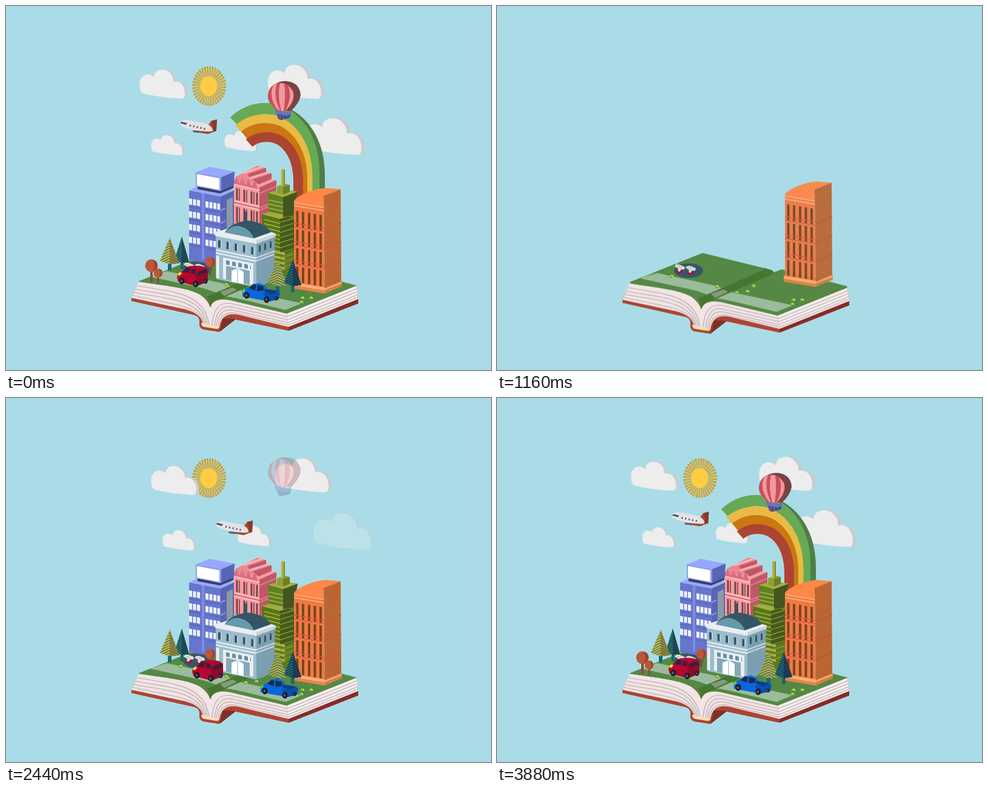
Animation, 800 px wide and 600 px high, one loop 3920 ms. Source, as an HTML page without scripts:

```html
<!DOCTYPE html>
<html lang="en">
<head>
<meta charset="utf-8">
<title>Pop-up city book</title>
<style>
html, body { margin: 0; height: 100%; overflow: hidden; background: #aadce7; }
svg { display: block; width: 800px; height: 600px; }

/* The page opens on the finished scene, 520 ms before the story starts over. */
.in, .drift, .book { animation: 3920ms linear -3400ms infinite; }
.in { --dy: 0px; animation-timing-function: cubic-bezier(.5, 1, .89, 1); }
.drop { --dy: -120px; }
.hop { --dy: -40px; }
.rise { --dy: 80px; }
.drift { --d: -7px -2px; animation-name: drift; }
.book { animation-name: book; transform-origin: 394px 470px; animation-delay: calc(-3400ms - var(--lag)); }

@keyframes drift {
  0%, 26.5% { translate: var(--a); }
  49% { translate: var(--b); }
  61.2% { translate: var(--c); }
  86.7% { translate: 0 0; }
  100% { translate: var(--d); }
}
@keyframes book {
  0% { opacity: 0; translate: 0 -365px; rotate: -37deg; }
  1% { opacity: .12; translate: 0 -347px; rotate: -36deg; }
  4.3% { opacity: .36; translate: 0 -148px; rotate: -27deg; }
  6.4% { opacity: 1; translate: 0 0; rotate: -6deg; }
  7.1% { translate: 0 31px; rotate: 0deg; }
  9.2% { translate: 0 -6px; }
  11.2% { translate: 0 2px; }
  13.8%, 15.8% { translate: 0 0; }
  16.3% { translate: 0 1px; }
  17.3% { translate: 0 5px; }
  20.7%, 100% { opacity: 1; translate: 0 0; rotate: 0deg; }
}
@keyframes office { 0%, 12.3% { opacity: 0; translate: 0 var(--dy); } 17.6% { opacity: 1; translate: 0 0; } }
@keyframes tower { 0%, 17.4% { opacity: 0; translate: 0 var(--dy); } 22% { opacity: 1; translate: 0 0; } }
@keyframes bank { 0%, 19.7% { opacity: 0; translate: 0 var(--dy); } 24.3% { opacity: 1; translate: 0 0; } }
@keyframes firs { 0%, 21.5% { opacity: 0; translate: 0 var(--dy); } 25.8% { opacity: 1; translate: 0 0; } }
@keyframes cloud1 { 0%, 20.5% { opacity: 0; } 23.5% { opacity: 1; } }
@keyframes cloud2 { 0%, 25.8% { opacity: 0; } 29.1% { opacity: 1; } }
@keyframes hotel { 0%, 27.6% { opacity: 0; translate: 0 var(--dy); } 32.2% { opacity: 1; translate: 0 0; } }
@keyframes flats { 0%, 30.1% { opacity: 0; translate: 0 var(--dy); } 34.7% { opacity: 1; translate: 0 0; } }
@keyframes firs2 { 0%, 33.2% { opacity: 0; translate: 0 var(--dy); } 37.3% { opacity: 1; translate: 0 0; } }
@keyframes late { 0%, 36.8% { opacity: 0; translate: 0 var(--dy); } 39.8% { opacity: 1; translate: 0 0; } }
@keyframes cars { 0%, 38.8% { opacity: 0; } 41.8% { opacity: 1; } }
@keyframes cloud3 { 0%, 48.4% { opacity: 0; } 52.2% { opacity: 1; } }
@keyframes grove { 0%, 52.1% { opacity: 0; translate: 0 var(--dy); } 56.2% { opacity: 1; translate: 0 0; } }
@keyframes bow { 0%, 56.2% { opacity: 0; translate: 0 var(--dy); } 63.3% { opacity: 1; translate: 0 0; } }
</style>
</head>
<body>
<svg viewBox="0 0 800 600" fill="none">
<defs>
  <path id="puff" d="M2,40C-2,24 2,10 16,9Q23,9 28,14C29,4 36,0 45,0C56,0 66,10 66,23C78,20 90,30 88,51Q87,56 80,56Q40,54 8,46Q3,45 2,40Z"/>
  <g id="cloud">
    <use href="#puff" x="5" y="-1" fill="#c9cbcd"/>
    <use href="#puff" fill="#ededee"/>
  </g>
  <clipPath id="cone"><path d="M0,0L-16,38L0,44L16,42Z"/></clipPath>
  <g id="fir">
    <path d="M-3,38h6v15q-3,2-6,0z" fill="#126a6c"/>
    <path d="M0,0L-16,38L0,44Z" fill="var(--l)"/>
    <path d="M0,0L16,42L0,44Z" fill="var(--r)"/>
    <g clip-path="url(#cone)" stroke="var(--s)" stroke-width="16" stroke-dasharray="1.4 2.8">
      <path d="M-8,0V60" transform="skewY(-25)"/>
      <path d="M8,0V60" transform="skewY(25)"/>
    </g>
  </g>
  <g id="ball">
    <path d="M-2,4h4v22q-2,2-4,0z" fill="#8a4a35"/>
    <circle r="10.5" fill="#bb5737"/>
    <path d="M2,-10A10.5,10.5 0 0 1 2,10Q8,0 2,-10Z" fill="#994433"/>
  </g>
  <g id="boat">
    <path d="M-6,5l3,4 7-2 2-4z" fill="#aa1133"/>
    <path d="M-9,-3Q-6,-8 1,-5L8,-2L7,2L2,2L-1,6L-4,4L-3,1Z" fill="#dfdcdc"/>
    <path d="M-5,-2Q0,-4 2,1" stroke="#aaa" />
  </g>
  <g id="bush">
    <path d="M-3,2Q-3,-2 1,-2Q4,-1 3,2Z" fill="#bbee55"/>
    <path d="M-4,1q3,3 7,1l-3,-2z" fill="#779933"/>
  </g>
  <g id="wheel">
    <ellipse rx="4.6" ry="5.4" fill="#1b1b2b"/>
    <ellipse cx="-.6" rx="2" ry="2.6" fill="#55586a"/>
  </g>

  <g id="volume">
    <path d="M207,481L219,456L463,507L578,461L581,484V490L466,535L376,516L352,537L326,533Q319,531 319,523V517Q318,511 310,509L207,486Z" fill="#ad4433"/>
    <path d="M466,528L581,483V490L466,535Z" fill="#882a26"/>
    <path d="M357,515L379,516L352,537Q356,528 357,515Z" fill="#7d3026"/>
    <path d="M322,522L352,527V529Q351,533 346,532L327,529Q322,528 322,522Z" fill="#ffddb0"/>
    <path d="M219,455C275,465 326,462 337,497C342,482 352,483 370,485L463,507L466,529L384,509Q356,503 352,529L325,524Q322,507 296,500L207,481Z" fill="#f1e5e5"/>
    <path d="M463,507L578,461L581,483L466,529Z" fill="#f4f0ef"/>
    <g stroke="#cbb9bd" stroke-width="1.7">
      <path d="M217,461C272,472 326,470 335,525M214,467C268,478 322,475 332,525M211,472C264,483 318,482 329,524M209,477L275,491Q322,500 326,523"/>
      <path d="M464,512L374,491Q343,484 340,526M465,517L376,497Q348,489 344,527M465,522L378,502Q351,495 347,528M466,526L382,507Q354,501 350,528"/>
      <path d="M464,512L579,466M465,517L579,471M465,522L580,476M466,526L580,480"/>
    </g>
    <path d="M219,454L339,406L449,433Q457,435 456,438L470,433L578,461L463,507L370,485C352,482 342,484 337,496C330,466 280,464 219,454Z" fill="#558844"/>
    <path d="M237,446L265,437L352,456Q370,460 380,467L488,490L461,501L395,485Q370,479 356,478Q345,470 320,464Z" fill="#9bbc9c"/>
    <path d="M442,431L452,434Q458,436 454,439L346,486Q339,489 337,496Q335,482 331,479Z" fill="#44772f"/>
    <path d="M353,471L374,464L381,468L360,478Z" fill="#88997a"/>
    <ellipse cx="316" cy="433" rx="24" ry="12" fill="#365568"/>
    <use href="#boat" x="302" y="429"/>
    <use href="#boat" x="320" y="431"/>
    <use href="#bush" x="288" y="442"/><use href="#bush" x="363" y="459"/>
    <use href="#bush" x="395" y="469"/><use href="#bush" x="413" y="467"/>
    <use href="#bush" x="423" y="458"/><use href="#bush" x="489" y="481"/>
    <use href="#bush" x="503" y="481"/><use href="#bush" x="487" y="488"/>
  </g>
</defs>

<!-- Sky -->
<g class="in" style="animation-name:late">
  <g transform="translate(335 132) scale(.85 1)">
    <circle r="24" stroke="#b8952d" stroke-width="17" pathLength="72" stroke-dasharray="1.3 .7"/>
    <circle r="22.5" stroke="#e3b137" stroke-width="17" pathLength="72" stroke-dasharray=".8 1.2"/>
    <circle r="16.5" cx="-1" fill="#ffcc44"/>
  </g>
</g>
<g class="in" style="animation-name:cloud2"><g class="drift" style="--a:26px 8px;--b:19px 7px;--c:13px 4.5px"><use href="#cloud" transform="translate(220 105) scale(.85)"/></g></g>
<g class="in" style="animation-name:cloud1"><g class="drift" style="--a:18.5px 3px;--b:12.5px 2.5px;--c:6.5px 1px"><use href="#cloud" transform="translate(431.5 97)"/></g></g>
<g class="in" style="animation-name:late"><g class="drift" style="--a:24px 6px;--b:19px 5px;--c:13px 3px"><use href="#cloud" transform="translate(239 213) scale(.59)"/></g></g>
<g class="in" style="animation-name:cars"><g class="drift" style="--a:27px 6px;--b:22px 5px;--c:16px 3px"><use href="#cloud" transform="translate(360 206) scale(.59)"/></g></g>
<g class="in" style="animation-name:cloud3"><g class="drift" style="--a:17px 5px;--b:16px 5px;--c:14px 4px"><use href="#cloud" transform="translate(491 185) scale(1.08)"/></g></g>

<g class="in rise" style="animation-name:bow">
  <path d="M385,186Q402,169 428,169C480,169 517,215 517,280V320" stroke="#4f7d47" stroke-width="18"/>
  <path d="M376,190Q398,169 428,169C472,169 508,212 508,275V320" stroke="#66aa55" stroke-width="18"/>
  <path d="M384,203Q402,187 428,187C466,187 497,226 497,283V320" stroke="#e8bb44" stroke-width="17"/>
  <path d="M393,213Q408,201 428,201C462,201 489,235 489,286V320" stroke="#cc7711" stroke-width="16"/>
  <path d="M401,226Q412,216 430,216C459,216 482,243 482,290V320" stroke="#ad4433" stroke-width="16"/>
</g>

<g class="in" style="animation-name:late"><g class="drift" style="--a:85px 22px;--b:59px 15px;--c:36px 10px;--d:-18px -5px">
  <path d="M333,197L339,189L348,187L347,206L336,207Z" fill="#a44630"/>
  <path d="M340,190L348,187L347,206L343,207Z" fill="#85392b"/>
  <path d="M286,195Q289,187 300,188L331,194Q341,199 341,206Q330,209 318,206Q296,203 286,195Z" fill="#e4e2e2"/>
  <path d="M290,191l9,2-2,3-10-3z" fill="#445577"/>
  <path d="M303,197L331,203" stroke="#445577" stroke-width="3" stroke-dasharray="2 4"/>
  <path d="M308,205l12,1 14,1 13-1-14,5-12-2-12-1z" fill="#a44630"/>
  <path d="M309,205l10,1v3l-9-1z" fill="#56607a"/>
</g></g>

<g class="in" style="animation-name:cloud3"><g class="drift" style="--a:0 -26px;--b:0 -26px;--c:0 -12px;--d:0 5px">
  <path d="M444,129Q452,123 464,124Q485,127 486,147Q484,160 470,173L452,172Z" fill="#774444"/>
  <path d="M432,150C432,134 442,127 453,127C465,127 475,136 475,150C474,162 464,170 461,174L446,172C442,166 432,160 432,150Z" fill="#cc4d5b"/>
  <path d="M441,131Q432,149 448,171L452,172Q440,148 447,128ZM452,127Q447,148 454,173L458,173Q462,148 459,128ZM465,131Q473,148 461,173Q478,155 473,140Z" fill="#ee99a0"/>
  <path d="M443,171L462,175L471,172L469,184L454,188L449,186Z" fill="#6677bb"/>
  <path d="M448,178L464,181L469,178L468,184L454,188L449,186Z" fill="#444e8c"/>
  <path d="M452,178v8M457,179v8" stroke="#ad5266" stroke-width="1.5"/>
</g></g>

<!-- Overlapping copies smear the book while it falls. -->
<use class="book" href="#volume" style="--lag:0ms"/>
<use class="book" href="#volume" style="--lag:5ms"/>
<use class="book" href="#volume" style="--lag:10ms"/>
<use class="book" href="#volume" style="--lag:15ms"/>
<use class="book" href="#volume" style="--lag:20ms"/>

<!-- Pink hotel -->
<g class="in drop" style="animation-name:hotel">
  <path d="M376,288L392,276L446,287V380L418,392L376,372Z" fill="#ff9aa3"/>
  <path d="M418,299L446,287V380L418,392Z" fill="#bd5967"/>
  <path d="M380,281L415,263L429,267V274L438,276V285L417,294L380,288Z" fill="#ee8590"/>
  <path d="M399,277L429,267V274L402,284ZM407,286L438,276V285L417,294Z" fill="#bd5967"/>
  <path d="M391,276L423,265M401,284L433,274" stroke="#ffb0b6" stroke-width="3"/>
  <g transform="translate(376 0) skewY(13)">
    <path d="M0,290l4-10 5,10 5-10 5,10 5-10 5,10 5-10 5,10v4H0z" fill="#d8707d"/>
    <path d="M0,294H42M0,321H42M0,326H42" stroke="#ffc2c4" stroke-width="2"/>
    <path d="M0,324H42" stroke="#bd5967" stroke-width="1.5"/>
    <path d="M5,299V319M5,330V356M17,299V319M17,330V356M29,299V319M29,330V356M38,299V319M38,330V356" stroke="#6b4a45" stroke-width="3"/>
    <path d="M9,299V319M9,330V356M21,299V319M21,330V356M33,299V319M33,330V356" stroke="#8c5a55" stroke-width="2"/>
  </g>
  <path d="M418,309L446,297M418,333L446,321M418,337L446,325" stroke="#dd7a86" stroke-width="2"/>
</g>

<!-- Blue flats -->
<g class="in drop" style="animation-name:flats">
  <path d="M302,304L316,297L376,303L354,314Z" fill="#99a8ff"/>
  <path d="M302,304L354,314V428L302,419Z" fill="#6676cc"/>
  <path d="M354,314L376,304V420L354,428Z" fill="#5765b4"/>
  <path d="M364,320L374,315V376L364,381Z" fill="#8a9ba6"/>
  <path d="M316,297L353,305L375,295V300L353,309L316,302Z" fill="#333f66"/>
  <path d="M313,274L336,265L377,273L355,282Z" fill="#99a8ff"/>
  <path d="M313,274L355,282V305L313,297Z" fill="#8c9cf2"/>
  <path d="M315,277L352,284V303L315,296Z" fill="#fff"/>
  <path d="M355,282L377,273L376,296L355,305Z" fill="#5765b4"/>
  <g transform="translate(302 0) skewY(10)">
    <path d="M0,322H19M0,343H19M0,364H19M0,385H19M27,322H51M27,343H51M27,364H51M27,385H51" stroke="#eef0ff" stroke-width="10" stroke-dasharray="5 1.5"/>
    <path d="M0,331H51M0,352H51M0,373H51M0,394H51" stroke="#5765b4" stroke-width="1.5"/>
    <path d="M23,304V414" stroke="#8795ea" stroke-width="6"/>
    <path d="M21,306V414M25,306V414" stroke="#5765b4"/>
  </g>
  <path d="M354,337l8-4M354,358l8-4M354,379l8-4" stroke="#8795ea" stroke-width="2"/>
</g>

<!-- Green tower -->
<g class="in drop" style="animation-name:tower">
  <path d="M438,394L475,390V438L460,446L438,436Z" fill="#5e7a1c"/>
  <path d="M422,344L445,336L475,343V402L452,410L425,400Z" fill="#557718"/>
  <path d="M452,350L475,343V402L452,410Z" fill="#445a1a"/>
  <path d="M422,343L445,336L475,343L452,351Z" fill="#a9ab42"/>
  <path d="M432,308L455,303L481,306L475,350L456,345L433,341Z" fill="#5e8020"/>
  <path d="M457,314L481,306L474,345L457,348Z" fill="#44551f"/>
  <path d="M432,308L455,302L481,306L457,315Z" fill="#a9ab42"/>
  <path d="M447,297L461,293L468,295V305L457,311L447,308Z" fill="#8ca236"/>
  <path d="M457,299L468,295V306L457,311Z" fill="#6a7d28"/>
  <path d="M454,270L457,268L460,270V298L454,297Z" fill="#b3b23f"/>
  <path d="M458,269L460,270V298H458Z" fill="#7b8830"/>
  <g stroke="#b1b14c" stroke-width="24" stroke-dasharray="1.6 5">
    <path d="M12,319V341" transform="translate(433 0) skewY(12)"/>
    <path d="M14,351V398" stroke-width="26" transform="translate(425 0) skewY(14)"/>
    <path d="M11,402V432" stroke-width="22" stroke-dasharray="4 4" transform="translate(438 0) skewY(12)"/>
  </g>
  <path d="M11,356V438" transform="translate(452 0) skewY(-17)" stroke="#8c9a3a" stroke-width="22" stroke-dasharray="1.4 7"/>
</g>

<!-- Bank -->
<g class="in drop" style="animation-name:bank">
  <path d="M346,376L413,390V464L347,450Z" fill="#9cbccc"/>
  <path d="M413,390L444,378L442,452L413,464Z" fill="#7b9fb1"/>
  <path d="M345,373L392,359L445,375V380L413,392L345,379Z" fill="#e9eef1"/>
  <path d="M413,386L445,375V380L413,392Z" fill="#c5d3dc"/>
  <path d="M361,373C368,361 387,353 402,354Q428,358 437,373L409,383Z" fill="#335566"/>
  <path d="M361,373Q372,360 386,363Q402,367 409,383Z" fill="#6799ac"/>
  <path d="M392,340l3-2 3,2v21h-6z" fill="#335566"/>
  <g transform="translate(346 0) skewY(11.5)">
    <path d="M4,391H64" stroke="#335566" stroke-width="12" stroke-dasharray="4 9.6"/>
    <path d="M8,391H64" stroke="#c8dae3" stroke-width="12" stroke-dasharray="1.5 12.1"/>
    <path d="M0,402H67M0,407H67" stroke="#e4ecf0" stroke-width="2.5"/>
    <path d="M12,412H62V447H56V425H17V447H12Z" fill="#e9eef1"/>
    <path d="M17,419H58" stroke="#6b8ea2" stroke-width="7" stroke-dasharray="6 4"/>
    <path d="M17,425H56V447H17Z" fill="#86a8ba"/>
    <path d="M26,449V431L36,425L46,429V449Z" fill="#fff"/>
    <path d="M36,426V449" stroke="#86a8ba"/>
    <path d="M3,411V448" stroke="#e9eef1" stroke-width="5"/>
  </g>
  <g transform="translate(413 0) skewY(-20)">
    <path d="M4,402H30" stroke="#335566" stroke-width="11" stroke-dasharray="3 6"/>
    <path d="M0,415H30M0,420H30" stroke="#c5d3dc" stroke-width="2.5"/>
  </g>
</g>

<!-- Orange office -->
<g class="in" style="animation-name:office;--dy:-200px">
  <path d="M475,321L524,329L526,470L475,461Z" fill="#ef7a43"/>
  <path d="M475,321C482,311 510,301 527,300L552,302L524,313V331L475,323Z" fill="#ff8747"/>
  <path d="M524,313L552,302L553,460L526,470Z" fill="#bb6632"/>
  <g transform="translate(475 0) skewY(9.5)">
    <path d="M0,324H49M0,329H49" stroke="#ffad78" stroke-width="2"/>
    <path d="M5.5,337V458M15,337V458M25,337V458M34.5,337V458M44,337V458" stroke="#7a4520" stroke-width="4" stroke-dasharray="26 4.5"/>
    <path d="M0,358H50M0,364H50M0,388H50M0,394H50M0,419H50M0,425H50" stroke="#dd5549" stroke-width="1.4"/>
    <path d="M-2,458H52" stroke="#ffb077" stroke-width="5"/>
    <path d="M-2,463H52" stroke="#e5854c" stroke-width="5"/>
  </g>
  <path d="M525,369L553,358M525,400L553,389M525,431L553,420" stroke="#c94f3d" stroke-width="1.6"/>
  <path d="M526,464L554,453V462L526,474Z" fill="#cf8045"/>
  <path d="M526,467L554,456" stroke="#ffb077" stroke-width="2"/>
</g>

<!-- Trees -->
<g class="in hop" style="animation-name:firs2">
  <use href="#fir" transform="translate(290 380) scale(.75 1)" style="--l:#2d7474;--r:#224b58;--s:#183d4a"/>
  <use href="#fir" x="270" y="382" style="--l:#c3b04d;--r:#a77b38;--s:#3f7a50"/>
</g>
<g class="in hop" style="animation-name:firs">
  <use href="#fir" x="448" y="418" style="--l:#b9a94a;--r:#b5ac55;--s:#2f6f52"/>
  <use href="#fir" transform="translate(473 418) scale(.9 1)" style="--l:#1e6a70;--r:#22405a;--s:#173048"/>
</g>
<g class="in hop" style="animation-name:late"><use href="#ball" transform="translate(337 422) scale(.82)"/></g>
<g class="in hop" style="animation-name:grove">
  <use href="#ball" x="240" y="428"/>
  <use href="#ball" transform="translate(251 440) scale(.7)"/>
</g>

<!-- Cars -->
<g class="in" style="animation-name:cars">
  <g class="drift" style="--a:25px 4px;--b:25px 4px;--c:21px 4px;--d:-11px -2px">
    <path d="M282,447Q284,439 291,437L298,430Q312,426 328,430Q333,433 333,442V454L314,462L284,454Z" fill="#b8062f"/>
    <path d="M313,440L333,433V454L314,462Z" fill="#8d0a2b"/>
    <path d="M291,438L298,431L304,432L302,440ZM306,433L313,434L312,442L305,441ZM316,438L330,433L331,439L317,444Z" fill="#35213d"/>
    <path d="M283,442l5-4 2,3-4,4z" fill="#d9ee33"/>
    <use href="#wheel" x="290" y="453"/>
    <use href="#wheel" x="313" y="458"/>
    <use href="#wheel" transform="translate(329 454) scale(.7)"/>
  </g>
  <g class="drift" style="--a:38px 8px;--b:30px 6px;--c:21px 4px;--d:-11px -2px">
    <path d="M390,473Q391,466 401,464L408,458L419,457L428,461L430,466L449,470L452,473L450,483L434,487L390,479Z" fill="#0a66dc"/>
    <path d="M424,474L452,472L450,483L434,487Z" fill="#084fae"/>
    <path d="M426,466L450,470L440,475L427,472Z" fill="#0b3f88"/>
    <path d="M401,465L407,459L413,460L411,469ZM415,460L425,462L425,469L414,470Z" fill="#1b2b50"/>
    <path d="M389,470l4-4 2,3-3,4z" fill="#55cc44"/>
    <use href="#wheel" x="397" y="477"/>
    <use href="#wheel" x="430" y="484"/>
    <use href="#wheel" transform="translate(446 482) scale(.6)"/>
  </g>
</g>
</svg>
</body>
</html>
```
